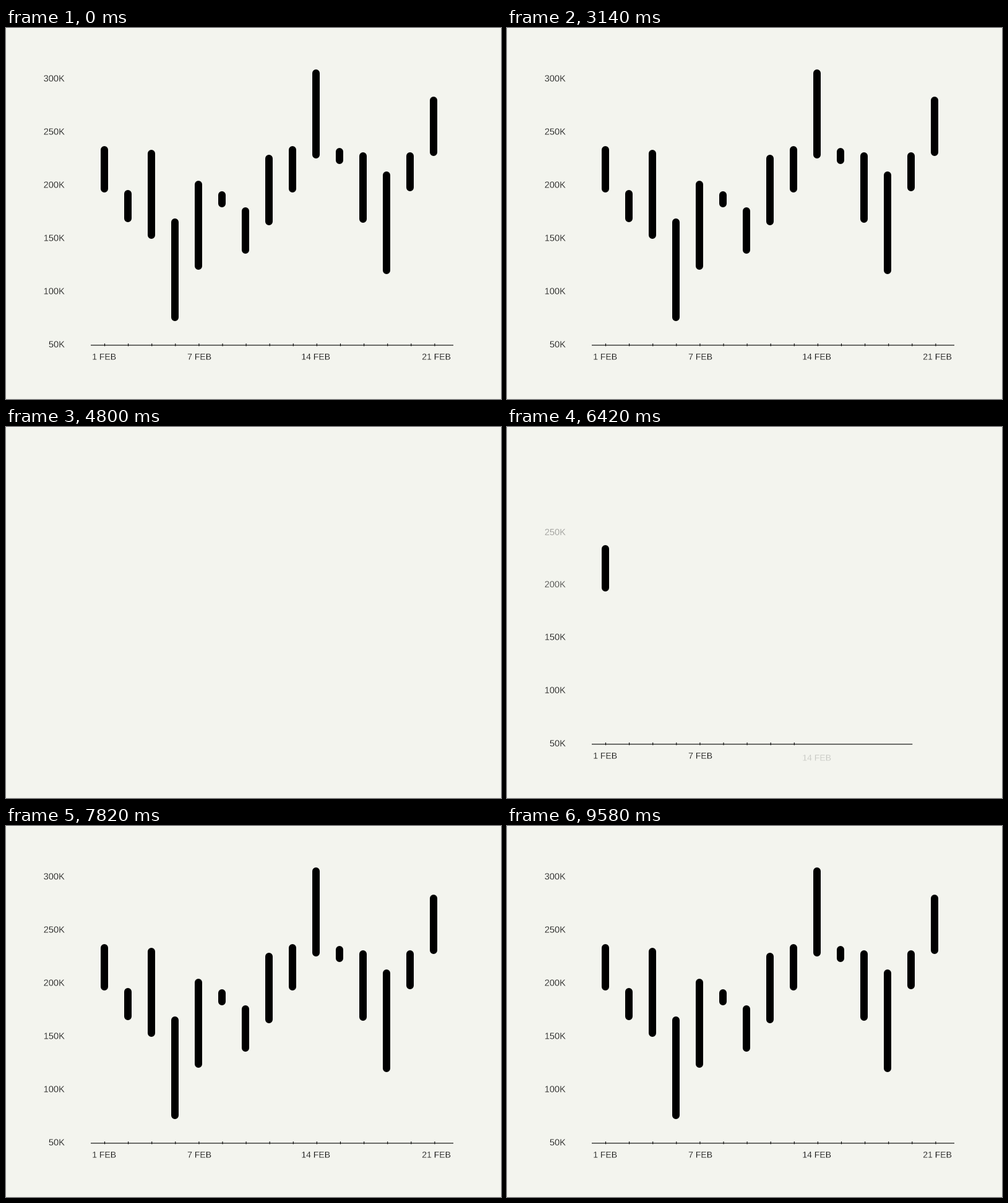
A matplotlib script for the animation above (9.6 s loop, 800x600 px).

```python
import matplotlib.pyplot as plt
from matplotlib import patheffects
from matplotlib.animation import FuncAnimation
from matplotlib.colors import to_rgb

W, H, DPI = 800, 600, 100
LOOP, STEP = 9600, 20
PX = 72 / DPI                      # points per pixel
BG, INK = "#f3f4ee", "#000000"

OUT_START, OUT_END = 4120, 4440
IN_START = 5760
SLIDE = 4                          # how far labels rise while fading in

# outer top and bottom of each rounded bar
BARS = [(191, 266), (262, 314), (197, 341), (308, 474), (247, 391),
        (264, 290), (290, 365), (205, 319), (191, 266), (67, 211),
        (194, 220), (201, 315), (232, 398), (201, 264), (111, 207)]
DAYS = [(0, 158.5, "1 FEB"), (4, 312.5, "7 FEB"),
        (9, 500.5, "14 FEB"), (14, 695.5, "21 FEB")]
AXIS_L, AXIS_R, AXIS_Y = 137, 723, 513
BAR_W = 12
CAP = BAR_W / 2


def clamp(v):
    return max(0.0, min(1.0, v))


def progress(t, start, length):
    return clamp((t - start) / length)


def ease_out(p):
    return 1 - (1 - p) ** 2


def shade(alpha):
    """Ink at the given opacity over the background."""
    return tuple(b + (i - b) * alpha for i, b in zip(to_rgb(INK), to_rgb(BG)))


fig = plt.figure(figsize=(W / DPI, H / DPI), dpi=DPI, facecolor=BG)
ax = fig.add_axes([0, 0, 1, 1])
ax.set_xlim(0, W)
ax.set_ylim(H, 0)
ax.axis("off")


def stroke(xs, ys, width, color=INK, cap="butt"):
    line, = ax.plot(xs, ys, color=color, lw=width * PX, solid_capstyle=cap)
    line.set_snap(False)
    return line


# a background-coloured outline thins the glyphs to a light weight
thin = [patheffects.Stroke(linewidth=0.3 * PX, foreground=BG)]


def label(x, y, text, size, align):
    return ax.text(x, y, text, fontname="Liberation Sans", fontsize=size * PX,
                   ha=align, va="baseline", color=INK, path_effects=thin)


stroke([0, W], [0.5, 0.5], 1, "#fbfbf8")
axis = stroke([AXIS_L, AXIS_R], [AXIS_Y, AXIS_Y], 1.1)
ticks = [stroke([159.5 + 38.1 * i] * 2, [510.3, 514.5], 1.1)
         for i in range(len(BARS))]
bars = [stroke([159 + 38 * i] * 2, [top + CAP, bottom - CAP], BAR_W, cap="round")
        for i, (top, bottom) in enumerate(BARS)]

# each label: artist, resting baseline, time it starts to appear
labels = []
for j in range(6):
    y = 516.5 - 86 * j
    art = label(95, y, f"{50 * (j + 1)}K", 14.6, "right")
    labels.append((art, y, 5920 + 100 * j))
for i, x, text in DAYS:
    art = label(x, 536.4, text, 14, "center")
    labels.append((art, 536.4, IN_START + 68 * i))


def leaving(t):
    """1 while the chart is shown, falling to 0 as it leaves."""
    return 1 - progress(t, OUT_START, OUT_END - OUT_START) ** 3


def state(t, start, length):
    if t < IN_START:
        return leaving(t)
    return progress(t, start, length)


def draw(n):
    t = n * STEP

    if t < IN_START:
        reach = leaving(t)
    else:
        reach = ease_out(progress(t, IN_START, 1000))
    axis.set_xdata([AXIS_L, AXIS_L + (AXIS_R - AXIS_L) * reach])
    axis.set_visible(reach > 0)

    for i, tick in enumerate(ticks):
        a = state(t, 5780 + 75 * i, STEP)
        tick.set_color(shade(a))
        tick.set_visible(a > 0)

    for i, (bar, (top, bottom)) in enumerate(zip(bars, BARS)):
        a = state(t, 6340 + 80 * i, 80)
        start, end = top + CAP, bottom - CAP
        bar.set_ydata([start, start + (end - start) * a])
        bar.set_color(shade(a))
        bar.set_visible(a > 0)

    for art, y, begin in labels:
        a = state(t, begin, 250)
        art.set_y(y + SLIDE * (1 - a))
        art.set_color(shade(a))
        art.set_visible(a > 0)
    return []


anim = FuncAnimation(fig, draw, frames=LOOP // STEP, interval=STEP,
                     init_func=lambda: draw(0), repeat=True, repeat_delay=0)
plt.show()
```
